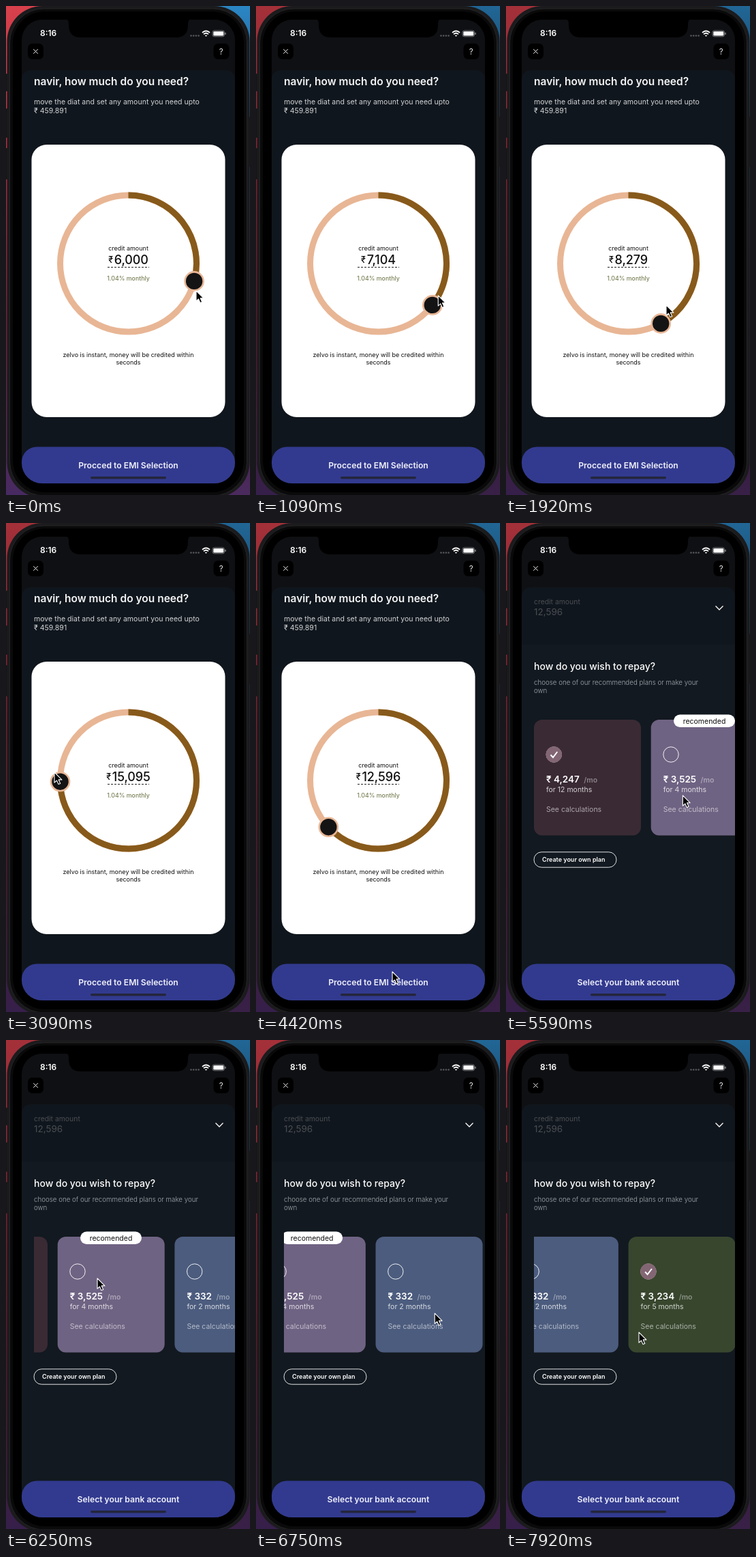
These frames come from a looping animation (358 px wide and 716 px high, 8000 ms). An HTML page:

```html
<!DOCTYPE html>
<html lang="en">
<head>
<meta charset="utf-8">
<title>Credit dial</title>
<style>
  html, body { margin: 0; width: 100%; height: 100%; overflow: hidden; background: #000; }
  svg { display: block; width: 100%; height: 100%; font-family: Inter, sans-serif; }
  .mid { text-anchor: middle; }
  .light { fill: #fff; }
</style>
</head>
<body>
<svg viewBox="0 0 358 716">
  <defs>
    <linearGradient id="leftGlow" x2="0" y2="1">
      <stop offset="0" stop-color="#d8414c"/><stop offset=".3" stop-color="#ad2b3d"/>
      <stop offset=".65" stop-color="#6f2038"/><stop offset="1" stop-color="#472a62"/>
    </linearGradient>
    <linearGradient id="rightGlow" x2="0" y2="1">
      <stop offset="0" stop-color="#2b86c4"/><stop offset=".3" stop-color="#1f4468"/>
      <stop offset=".7" stop-color="#43203a"/><stop offset="1" stop-color="#4b2a5e"/>
    </linearGradient>
    <clipPath id="screen"><rect x="23" y="20" width="313" height="679" rx="30"/></clipPath>
    <clipPath id="rail"><rect x="41" y="270" width="295" height="200"/></clipPath>
  </defs>

  <g id="wallpaper">
    <rect width="179" height="716" fill="url(#leftGlow)"/>
    <rect x="179" width="179" height="716" fill="url(#rightGlow)"/>
  </g>
  <g fill="#161617">
    <rect y="99" width="5" height="26" rx="1"/>
    <rect y="150" width="5" height="43" rx="1"/>
    <rect y="208" width="5" height="46" rx="1"/>
    <rect x="354" y="162" width="4" height="74" rx="1"/>
  </g>
  <rect x="1.5" y="0" width="356" height="720" rx="52" fill="#1b1b1d"/>
  <rect x="5.5" y="4" width="348" height="713" rx="50" fill="#0a0a0b" stroke="#252527"/>
  <rect x="10" y="8" width="339" height="704" rx="47" fill="#000"/>

  <g clip-path="url(#screen)">
    <rect x="23" y="20" width="313" height="680" fill="#0f1013"/>
    <rect x="23" y="94" width="313" height="620" rx="13" fill="#10161d"/>

    <g id="header">
      <text x="41" y="115.5" font-size="15.5" font-weight="600" fill="#f4f5f6">navir, how much do you need?</text>
      <g font-size="10.55" fill="#cfd2d5">
        <text x="41" y="143.5">move the diat and set any amount you need upto</text>
        <text x="41" y="156.5">₹ 459.891</text>
      </g>
    </g>

    <g id="dialCard">
      <rect x="37.5" y="203" width="284" height="399" rx="22" fill="#fff"/>
      <g fill="none" stroke-width="9">
        <circle cx="179.5" cy="377" r="100" stroke="#e8b695"/>
        <path id="arc" stroke="#875a1b"/>
      </g>
      <circle id="knob" r="13.5" fill="#141414" stroke="#e8b695" stroke-width="2.6"/>
      <g class="mid" fill="#111">
        <text x="179.5" y="358" font-size="9">credit amount</text>
        <text x="179.5" y="378" font-size="18" font-weight="500" letter-spacing="-.1"><tspan dy="-1.8" font-size="12.5">₹</tspan><tspan id="amount" dx="1.8" dy="1.8"></tspan></text>
        <text x="179.5" y="402" font-size="8.8" font-weight="500" fill="#7a8056">1.04% monthly</text>
        <text x="179.5" y="514" font-size="9">zelvo is instant, money will be credited within</text>
        <text x="179.5" y="525" font-size="9">seconds</text>
      </g>
      <path d="M149 382.5h61" stroke="#222" stroke-dasharray="3 2"/>
    </g>

    <g id="firstButton"></g>

    <g id="summary">
      <g fill="#fff" fill-opacity=".24">
        <text x="41" y="119" font-size="10.4">credit amount</text>
        <text x="41" y="134.5" font-size="13.5">12,596</text>
      </g>
      <path d="M307.5 121.5l5.5 5.5 5.5-5.5" fill="none" stroke="#fff" stroke-width="1.3"/>
    </g>

    <g id="sheet">
      <rect x="23" y="178" width="313" height="700" fill="#121920"/>
      <text x="41" y="214.5" font-size="14" font-weight="500" class="light">how do you wish to repay?</text>
      <g font-size="9.75" font-weight="300" fill="#a6abb0">
        <text x="41" y="236.5">choose one of our recommended plans or make your</text>
        <text x="41" y="249">own</text>
      </g>
      <g clip-path="url(#rail)"><g id="plans"></g></g>
      <rect x="41" y="481.8" width="121" height="22.4" rx="11.2" fill="none" stroke="#dfe1e3"/>
      <text x="53" y="496" font-size="9" font-weight="600" class="light">Create your own plan</text>
      <g id="secondButton"></g>
    </g>
    <rect id="homeBar" x="124" y="689" width="111" height="3.6" rx="1.8"/>
  </g>

  <path d="M86 19q6 0 6 7v2q0 18 18 18h139q18 0 18-18v-2q0-7 6-7z"/>
  <text x="50" y="44" font-size="12" font-weight="600" class="light">8:16</text>
  <g fill="#55585c">
    <circle cx="271.5" cy="43.5" r="1.3"/><circle cx="275.2" cy="43.5" r="1.3"/>
    <circle cx="278.9" cy="43.5" r="1.3"/><circle cx="282.6" cy="43.5" r="1.3"/>
  </g>
  <g fill="none" stroke="#fff" stroke-width="1.8">
    <path d="M288 39q5.5-5 11 0M290 41.4q3.5-3.2 7 0"/>
    <path d="M292.3 43.2h2.4l-1.2 1.2z" stroke-width="1"/>
  </g>
  <rect x="303" y="36" width="17.5" height="8.8" rx="2.6" fill="none" stroke="#8b8d90" stroke-width=".8"/>
  <rect x="304.3" y="37.2" width="15" height="6.4" rx="1.4" class="light"/>
  <rect x="321.3" y="38.8" width="1.3" height="3.2" rx=".6" fill="#8b8d90"/>
  <g fill="#000">
    <rect x="32" y="55" width="23" height="23" rx="6.5"/>
    <rect x="304.5" y="55" width="23" height="23" rx="6.5"/>
  </g>
  <path d="M40.2 63.2l6.6 6.6m0-6.6l-6.6 6.6" stroke="#e4e4e4" stroke-width="1"/>
  <text x="315.7" y="71" font-size="11.5" class="mid" fill="#e4e4e4">?</text>

  <path id="cursor" d="M0 0v15.2l3.5-3.2 2.5 5.6 2.7-1.2-2.5-5.5h4.7z" fill="#000" stroke="#fff" stroke-width="1.1" stroke-linejoin="round"/>
</svg>

<script>
const LOOP = 8000, STEP = 1000 / 12;
const el = id => document.getElementById(id);
const set = (id, attrs) => { for (const k in attrs) el(id).setAttribute(k, attrs[k]); };

// Rows start with a key, followed by the values to interpolate.
const cursorPath = [
  [0, 279, 417], [300, 279, 417], [1100, 267, 424], [23 * STEP, 235, 438],
  [2300, 184, 474], [2600, 126, 463], [2850, 86, 420], [37 * STEP, 71, 365],
  [3260, 70, 360], [3750, 97, 437], [3950, 112, 480], [4350, 200, 657],
  [4600, 200, 657], [5000, 208, 633], [5450, 250, 430], [5750, 271, 360],
  [6250, 134, 349], [6400, 105, 352], [6700, 280, 400], [7150, 120, 402],
  [7500, 195, 428]
];
const dialAngle = [
  [300, 105], [23 * STEP, 151.5], [2300, 183], [2600, 215], [2850, 243],
  [37 * STEP, 269], [3260, 272], [3750, 227]
];
const angleValue = [[105, 6000], [151.5, 8279], [227, 12596], [269, 15095], [272, 15270]];
const railScroll = [[5750, 0], [6250, 137], [6450, 185], [6700, 190], [7150, 360], [7300, 376.5]];
const CHECK_TIME = 7450;

function track(rows, x) {
  const next = rows.findIndex(row => row[0] > x);
  if (next === 0) return rows[0].slice(1);
  if (next < 0) return rows[rows.length - 1].slice(1);
  const a = rows[next - 1], b = rows[next];
  const k = (x - a[0]) / (b[0] - a[0]);
  return a.slice(1).map((v, i) => v + (b[i + 1] - v) * k);
}

const button = label => `
  <rect x="23" y="645.6" width="313" height="54" rx="22" fill="#323a8f"/>
  <text x="179.5" y="677" font-size="12.2" font-weight="600" class="mid" fill="#eff0fa">${label}</text>`;

const plans = [
  ['4,247', 12, '#3a2a34'], ['3,525', 4, '#6f6383'],
  ['332', 2, '#4c5c7e'], ['3,234', 5, '#38462e']
];
const planCard = ([price, months, color], i) => `
  <g transform="translate(${41 + i * 171.7} 288)">
    <rect width="157" height="169.5" rx="12" fill="${color}"/>
    <circle cx="29.3" cy="51" r="11.2" fill="none" stroke="#fff" stroke-width=".9"/>
    <g id="check${i}">
      <circle cx="29.3" cy="51" r="11.7" fill="#836674"/>
      <path d="M24.5 51.5l3.5 3.8 6.3-8.3" fill="none" stroke="#fff" stroke-width="2"/>
    </g>
    <text x="18" y="92" font-size="13.5" font-weight="600" fill="#fff">₹ ${price}<tspan dx="6.5" font-size="10.5" fill-opacity=".42">/mo</tspan></text>
    <text x="18" y="105.5" font-size="10.5" fill="#fff" fill-opacity=".78">for ${months} months</text>
    <text x="18" y="135" font-size="10.5" fill="#fff" fill-opacity=".58">See calculations</text>
    ${i === 1 ? `<rect x="33.3" y="-7.5" width="90" height="18.5" rx="9.2" fill="#fff"/>
    <text x="78.3" y="5.5" font-size="10.5" class="mid" fill="#111">recomended</text>` : ''}
  </g>`;

el('firstButton').innerHTML = button('Procced to EMI Selection');
el('secondButton').innerHTML = button('Select your bank account');
el('plans').innerHTML = plans.map(planCard).join('');

function drawDial(t) {
  const [angle] = track(dialAngle, t);
  const rad = angle * Math.PI / 180;
  const x = 179.5 + 100 * Math.sin(rad), y = 377 - 100 * Math.cos(rad);
  set('arc', { d: `M179.5 277A100 100 0 ${angle > 180 ? 1 : 0} 1 ${x} ${y}` });
  set('knob', { cx: x, cy: y });
  el('amount').textContent = Math.round(track(angleValue, angle)[0]).toLocaleString('en-US');
}

function drawSheet(t) {
  const k = Math.min(1, Math.max(0, (t - 4500) / 775));
  const p = (1 - Math.cos(Math.PI * k)) / 2;
  const drop = 538 * (1 - p);
  set('sheet', { transform: `translate(0 ${drop})` });
  set('dialCard', { transform: `translate(0 ${18 * p})` });
  set('header', { opacity: Math.max(0, 1 - 1.08 * p) });
  set('summary', { opacity: p });
  const overSheet = drop < 511 && drop > 43;
  set('homeBar', { fill: overSheet ? '#505358' : '#25263c' });
}

function drawPlans(t) {
  set('plans', { transform: `translate(${-track(railScroll, t)[0]} 0)` });
  const chosen = t < CHECK_TIME ? 0 : 3;
  plans.forEach((_, i) => set('check' + i, { visibility: i === chosen ? 'visible' : 'hidden' }));
}

function draw(time) {
  const t = Math.floor((time % LOOP) / STEP + 0.01) * STEP;
  set('wallpaper', { opacity: t < 160 ? 1 : 0.76 });
  drawDial(t);
  drawSheet(t);
  drawPlans(t);
  set('cursor', { transform: `translate(${track(cursorPath, t).join(' ')})` });
}

const start = performance.now();
function tick() {
  draw(performance.now() - start);
  requestAnimationFrame(tick);
}
tick();
</script>
</body>
</html>
```
